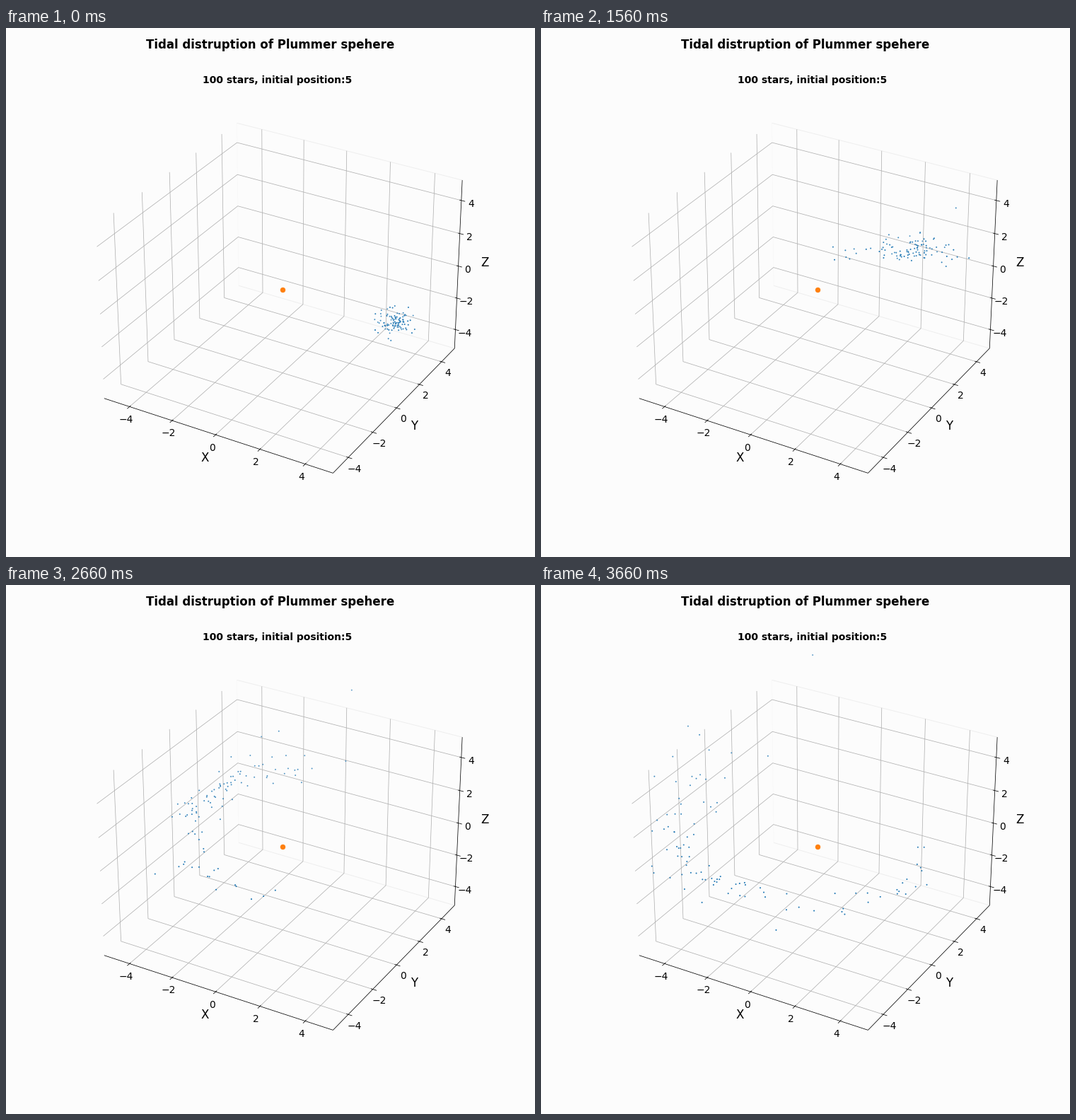
Animation of 748x748 px, one loop 3.81 s. Source, as a matplotlib script:

```python
import numpy as np
import matplotlib.pyplot as plt
from matplotlib.animation import FuncAnimation
from matplotlib.collections import LineCollection
from matplotlib.colors import to_rgb
from matplotlib.patches import Rectangle

SIZE, DPI = 748, 68
STEP, LOOP, HOLD, TICK = 10, 3810, 760, 100   # ms
STATES = 31
E = 5 + 5 / 24                                # half width of the box
TICKS = (-4, -2, 0, 2, 4)
CENTER = np.array([391.12, 369.96])
SCALE = 3113.3
BIG, SMALL = 16.62, 13.85                     # text heights in pixels

# camera basis for elevation 30, azimuth -60
el, az = np.radians([30, -60])
OUT = np.array([np.cos(el) * np.cos(az), np.cos(el) * np.sin(az), np.sin(el)])
RIGHT = np.array([-np.sin(az), np.cos(az), 0])
UP = np.cross(OUT, RIGHT)
BOX = np.array([8, 8, 6]) / 70
OMEGA = np.radians(8)                         # mean turn per state


def project(points):
    """Perspective view: pixel positions and depths."""
    p = np.asarray(points, float) * BOX
    depth = 10 - p @ OUT
    flat = np.stack([p @ RIGHT, -(p @ UP)], axis=-1)
    return CENTER + SCALE * flat / depth[..., None], depth


def cluster(n, rng):
    """Plummer-like ball of stars around (5, 0, 0) on a circular orbit."""
    d = rng.normal(size=(n, 3))
    d /= np.linalg.norm(d, axis=1, keepdims=True)
    r = 0.42 / np.sqrt(rng.uniform(0.04, 0.78, n) ** (-2 / 3) - 1)
    pos = d * r[:, None] + [5, 0, 0]
    vel = rng.normal(0, 0.045, (n, 3)) + [0, 5 * OMEGA, 0]
    return pos, vel


def simulate(pos, vel, sub=20):
    """Leapfrog orbits about the central mass, one entry per state."""
    gm, dt = OMEGA ** 2 * 125, 1 / sub

    def pull(x):
        return -gm * x / np.linalg.norm(x, axis=1, keepdims=True) ** 3

    track = [pos.copy()]
    for _ in range(STATES - 1):
        for _ in range(sub):
            vel = vel + pull(pos) * dt / 2
            pos = pos + vel * dt
            vel = vel + pull(pos) * dt / 2
        track.append(pos.copy())
    return np.array(track)


pos, vel = cluster(97, np.random.default_rng(12))
runaways = np.array([
    [5.3, 0.3, 0.35, 0.00, 0.84, 0.21],
    [5.3, 0.1, -0.1, -0.10, 0.82, 0.03],
    [5.6, -0.2, 0.0, 0.12, 0.70, 0.00],
])
track = simulate(np.vstack([pos, runaways[:, :3]]),
                 np.vstack([vel, runaways[:, 3:]]))
spots, depths = project(track)

plt.rcParams["font.family"] = "DejaVu Sans"
fig = plt.figure(figsize=(SIZE / DPI, SIZE / DPI), dpi=DPI, facecolor="#fcfcfc")
ax = fig.add_axes([0, 0, 1, 1])
ax.set(xlim=(0, SIZE), ylim=(SIZE, 0))
ax.axis("off")


def lines(paths, color, width, z):
    ax.add_collection(LineCollection([project(p)[0] for p in paths],
                                     colors=color, linewidths=width, zorder=z))


def label(spot, text, px, va, **kw):
    ax.text(*spot, text, fontsize=px * 72 / DPI, ha="center", va=va,
            color="black", **kw)


# faint edges of the back pane
lines([[(-E, E, E), (E, E, E)], [(-E, E, -E), (E, E, -E)]], "#eeeeee", 1, 1)
lines([[(-E, E, E), (-E, E, -E)]], "#f8f8f8", 0.8, 1)

grid = []
for t in TICKS:
    grid += [[(t, -E, -E), (t, E, -E), (t, E, E)],
             [(E, t, -E), (-E, t, -E), (-E, t, E)],
             [(-E, -E, t), (-E, E, t), (E, E, t)]]
lines(grid, "#b0b0b0", 0.8, 2)

lines([[(-E, -E, -E), (E, -E, -E)],
       [(E, -E, -E), (E, E, -E)],
       [(E, E, -E), (E, E, E)]], "black", 0.8, 3)


def around(t, d):
    """Value t on each of the three axes, moved outwards to distance d."""
    return (t, -d, -d), (d, t, -d), (d, d, t)


near, far = E - 1 / 12, E + 1 / 6
marks = []
for t in TICKS:
    marks += [[(t, -near, -E), (t, -far, -E)],
              [(near, t, -E), (far, t, -E)],
              [(near, E, t), (far, E, t)]]
    for spot in around(t, E + 0.285):
        label(project(spot)[0], str(t).replace("-", "\u2212"), SMALL, "top")
lines(marks, "black", 0.8, 3)

for name, spot in zip("XYZ", around(0, E + 0.802)):
    label(project(spot)[0], name, BIG, "center")
label((SIZE / 2, 0.02 * SIZE), "Tidal distruption of Plummer spehere",
      BIG, "top", weight="bold")
label((383.35, 78), "100 stars, initial position:5",
      SMALL, "baseline", weight="bold")

ax.scatter(*CENTER, s=47, color="#ff7f0e", zorder=5)
stars = ax.scatter(*spots[0].T, s=1.3, color="#1f77b4", zorder=4)
stars.set_clip_path(Rectangle((95.4, 89.8), 576, 576, transform=ax.transData))


def shade(depth):
    """Distant stars fade towards the background."""
    fade = (depth - depth.min()) / np.ptp(depth)
    rgba = np.ones((len(depth), 4))
    rgba[:, :3] = to_rgb("#1f77b4")
    rgba[:, 3] = 1 - 0.45 * fade
    return rgba


def update(i):
    ms = i * STEP
    k = 0 if ms < HOLD else min((ms - HOLD) // TICK + 1, STATES - 1)
    stars.set_offsets(spots[k])
    stars.set_color(shade(depths[k]))
    return (stars,)


anim = FuncAnimation(fig, update, frames=LOOP // STEP, interval=STEP,
                     repeat=True, repeat_delay=0, blit=False)
plt.show()
```
